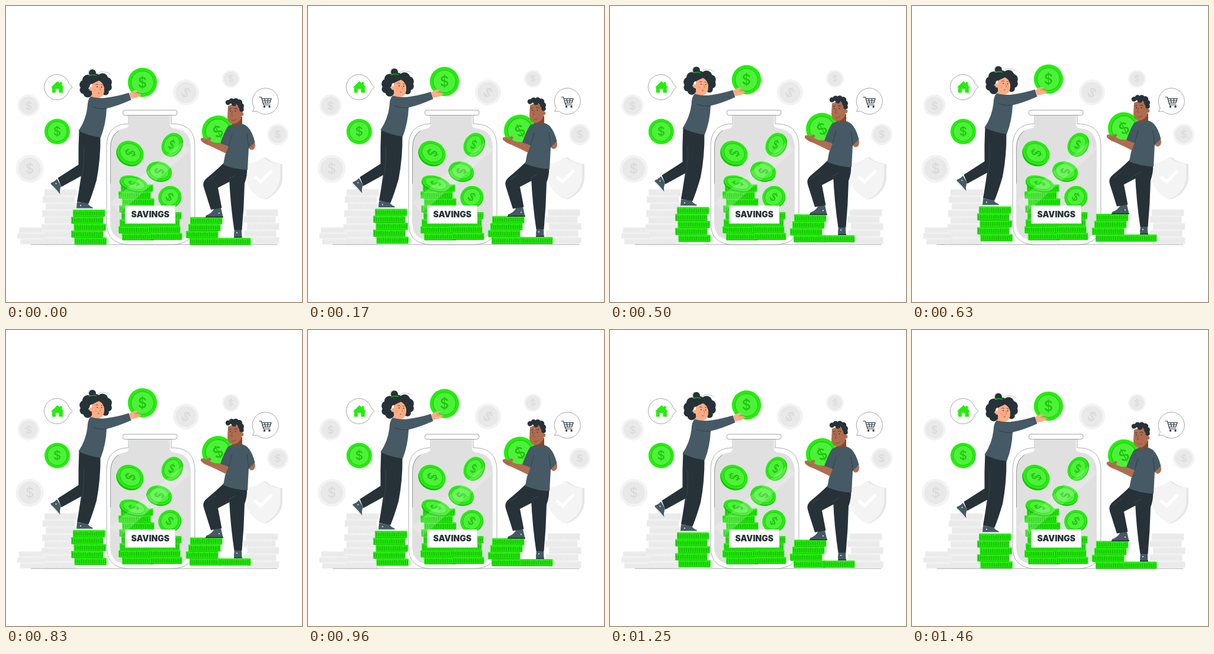
Recreate the animation shown at these times as an HTML page with a canvas. Size 500 by 500 pixels, loop 1.5 s.

```html
<!DOCTYPE html>
<html lang="en">
<head>
<meta charset="utf-8">
<title>Savings</title>
<style>
  html, body { margin: 0; width: 100%; height: 100%; overflow: hidden; background: #fff; }
  canvas { display: block; width: 100vw; height: 100vh; }
</style>
</head>
<body>
<canvas id="stage" width="500" height="500"></canvas>
<script>
const ctx = document.getElementById('stage').getContext('2d');
const LOOP = 1500, LIFT = 20 / 3;
const INK = '#263238', SHIRT = '#455a64', LINE = '#6d7377';
const GREEN = { rim: '#24ee0c', face: '#4df139', mark: '#1cc40b', edge: '#17bd08', ridge: '#0b8500', seam: '#0f9d03' };
const GREY = { rim: '#f3f3f3', face: '#e9e9e9', mark: '#dadada', edge: '#e3e3e3' };
const PALE = { rim: '#ededed', ridge: '#e2e2e2', seam: '#f9f9f9' };

function shape(d, fill, stroke, width = 0.7) {
  const p = new Path2D(d);
  if (fill) { ctx.fillStyle = fill; ctx.fill(p); }
  if (stroke) { ctx.strokeStyle = stroke; ctx.lineWidth = width; ctx.stroke(p); }
}

function disc(x, y, r, fill, stroke, width = 0.7, ry = r) {
  ctx.beginPath();
  ctx.ellipse(x, y, r, ry, 0, 0, 7);
  if (fill) { ctx.fillStyle = fill; ctx.fill(); }
  if (stroke) { ctx.strokeStyle = stroke; ctx.lineWidth = width; ctx.stroke(); }
}

// A coin seen at an angle; depth is the visible thickness, turn rotates the mark.
function coin(x, y, rx, ry, tilt, tone, turn = 0, depth = 0) {
  ctx.save();
  ctx.translate(x, y);
  ctx.rotate(tilt);
  ctx.scale(rx / 25, ry / 25);
  if (depth) disc(0, depth, 25, tone.edge);
  disc(0, 0, 25, tone.rim);
  disc(0, 0, 19.3, tone.face, tone.edge, 0.9);
  ctx.rotate(turn);
  ctx.fillStyle = tone.mark;
  ctx.font = '500 24px Inter, sans-serif';
  ctx.textAlign = 'center';
  ctx.textBaseline = 'alphabetic';
  ctx.fillText('$', 0, 8.7);
  ctx.restore();
}

// One coin per left edge, stacked downwards from the top.
function stack(top, lefts, tone, h = 11.75, w = 54.5) {
  lefts.forEach((x, i) => {
    const y = top + i * h;
    ctx.fillStyle = tone.rim;
    ctx.beginPath();
    ctx.roundRect(x, y, w, h, 1.2);
    ctx.fill();
    ctx.strokeStyle = tone.ridge;
    ctx.lineWidth = 0.75;
    ctx.beginPath();
    for (let k = 0; k < 17; k++) {
      const lx = x + 2.6 + k * (w - 5) / 16;
      ctx.moveTo(lx, y + 2.4 + k % 3 * 0.5);
      ctx.lineTo(lx, y + h - 2);
    }
    ctx.stroke();
    ctx.strokeStyle = tone.seam;
    ctx.beginPath();
    ctx.moveTo(x + 1, y + h - 0.3);
    ctx.lineTo(x + w - 1, y + h - 0.3);
    ctx.stroke();
  });
}

function background() {
  coin(38, 168, 18.7, 18.7, 0, GREY);
  coin(40, 275, 23.6, 23.6, 0, GREY);
  coin(304, 146, 22, 22, 0, GREY, 0.6);
  coin(380, 123, 15, 15, 0, GREY);
  coin(459, 217, 18, 18, 0, GREY);

  shape('M438 255Q449 265 467 267V292Q464 316 438 327Q409 313 405 288V267Q426 265 438 255Z', '#e6e6e6');
  shape('M434 255Q445 265 463 267V292Q460 316 434 327Q407 313 404 288V267Q423 265 434 255Z', '#f4f4f4');
  shape('M420 288L430 297L449 278', null, '#fff', 5.5);

  stack(374, [22, 19, 24], PALE, 9.7);
  stack(309.5, [65, 62, 67, 61, 65, 60, 66, 64], PALE);
  stack(343.5, [405, 401, 407, 402, 407], PALE);
  shape('M42 403H458', null, LINE, 0.6);
}

function bubbles() {
  shape('M106.3 130.5L112 137.2L106.5 143A21.4 21.4 0 1 1 106.3 130.5Z', '#fff', LINE, 0.65);
  shape('M76 137.5L87 127L91 130.8V128.5H94.5V134L98 137.5H96V146.5H89.5V140H84V146.5H78V137.5Z', GREEN.rim);

  shape('M419.4 172.2L416.5 178.2L424 177.6A22 22 0 1 0 419.4 172.2Z', '#fff', LINE, 0.65);
  shape('M427.5 154H431.5L435 167H446.5M432 156.5H448L445.5 164H434.3M433 160H446.5M437 156.5L438.3 164M442.5 156.5L442 164', null, INK, 1.2);
  disc(436.5, 170, 1.7, INK);
  disc(445, 170, 1.7, INK);
}

function jar() {
  const body = 'M207 184V201Q207 206 200 207Q176 211 176 239V366Q176 395 207 395.5H282Q312 395 312 366V239Q312 211 286 207Q277 206 277 201V184Z';
  shape('M207 184V199H204Q170 201 170 237V366Q170 402 207 403H281Q319 402 319 366V237Q319 201 284 199H279V184Z', '#fff', LINE, 0.6);
  shape(body, '#e0e0e0');
  shape('M176.5 300V239Q177 219 190 211', null, '#666', 0.6);
  shape('M200.5 176H286Q289 176 289 179V181Q289 184.5 285.5 184.5H200Q197.5 184 197.5 181.5V179Q197.5 176 200.5 176Z', '#fff', LINE, 0.65);

  stack(301.5, [194, 190, 196, 191, 195, 192, 190, 196], GREEN);
  stack(348, [242, 239, 240, 243], GREEN);

  coin(210, 248, 23.4, 19.5, 0.5, GREEN, 1.4, 3.5);
  coin(280, 234, 20.8, 16.2, -1.05, GREEN, 1.35, 3);
  coin(259, 279, 21.6, 16, 0.25, GREEN, 1.5, 3);
  coin(216, 299.5, 24.4, 12, 0.28, GREEN, 1.4, 5);
  coin(276.5, 322.5, 19.6, 18.3, -0.5, GREEN, 1.1, 1.5);

  ctx.save();
  ctx.clip(new Path2D(body));
  shape('M298 230L312 243L192 350L176 332Z', 'rgba(255,255,255,.2)');
  ctx.restore();

  ctx.fillStyle = '#fff';
  ctx.fillRect(201, 337, 85, 30.5);
  shape('M201 367.5H286V337', null, '#c8c8c8', 0.6);
  ctx.fillStyle = INK;
  ctx.font = '900 14px Inter, sans-serif';
  ctx.textAlign = 'center';
  ctx.textBaseline = 'alphabetic';
  ctx.fillText('SAVINGS', 243.8, 357.2);
}

function woman() {
  const skin = '#ffad86', lips = '#c9603f';
  stack(344, [113, 110, 114.5, 110, 115.5], GREEN);
  coin(230.5, 129, 24.7, 24.7, 0, GREEN);

  // Shoes, then the legs over them
  shape('M86 292L93 304Q90 311 91.5 318Q84 309 76 302L75.5 299Q82 297 86 292Z', SHIRT);
  shape('M76 301Q84 308 91.5 318.5L90 319Q81 310 74.5 301Z', '#e3e6e8');
  disc(84.5, 300, 1, '#fff');
  shape('M120 331L138 333Q140 338 146.5 340V342.5H119Z', SHIRT);
  shape('M119 341.5H147V343.5H119Z', '#dfe3e5');
  disc(126, 337, 1, '#fff');
  shape('M123.5 210Q122 239 122.5 268L87.5 290.5L93.5 305.5L129 286L151 256L158 220Z', INK);
  shape('M124 212L159.5 219Q160 258 153 294Q146 318 139.5 334L120 330.5Q126 296 129 270Q128 242 124 212Z', INK);
  shape('M131 240Q133 269 127 296', null, SHIRT, 0.5);

  shape('M142 147H157V160L145 159Z', skin);
  shape('M143 153Q138 157 137.5 171Q135 192 122.5 211Q139 219 160 222Q169 199 170 173Q188 169 211.5 158.5L207.5 146.5Q187 153 165 155.5Q154 156 143 153Z', SHIRT);
  shape('M170 173Q158 175 146 170', null, INK, 0.6);
  shape('M208 148Q214 143 219 142L223 144L217 147.5Q223 146 228.5 149.5L226 153Q219 155.5 211.5 156.5Z', skin);
  shape('M217 148L227 150', null, '#d87f58', 0.6);

  const curls = [[146, 113, 6], [138, 125, 9], [151, 124, 10], [163, 123, 9.5], [170, 129, 8.8],
    [133, 133, 8.8], [131, 142, 6.5], [138, 147, 7.5], [172, 137, 6.8], [168, 145, 5.8]];
  curls.forEach(([x, y, r]) => disc(x, y, r, INK));
  shape('M140.5 118Q146 115 153 117.5', null, GREEN.edge, 1.3);
  shape('M154 116Q159 109 167 112Q174 112 176 116M140 117Q136 108 145 107', null, '#7d858a', 0.5);
  shape('M145 132Q150 129 157 126Q163 129 165 135Q167 142 165 148Q162 155 156 155Q149 154 145 147Z', skin);
  disc(143.8, 140, 3.3, skin);
  disc(154, 136.5, 0.9, INK);
  disc(161.6, 137, 0.9, INK);
  shape('M151 133Q153 131 156 133M160 133L163.5 133.5', null, INK, 0.7);
  shape('M158.3 137L160 142L157.8 142.3', null, lips, 0.7);
  disc(156.5, 147, 1.4, lips, null, 0, 1);
  disc(151, 142, 2, 'rgba(255,110,80,.22)');
}

function man() {
  const skin = '#af6d50', shade = '#814930';
  stack(356.5, [311, 308, 304, 310], GREEN);
  stack(391.7, [359], GREEN);

  shape('M352 342L363 341L366.5 356H338V353.5Q347 351 352 342Z', SHIRT);
  shape('M337 355.5H367V357.3H337Z', INK);
  disc(360, 350, 1, '#fff');
  shape('M386 377H398L398.5 391H385.5L385 386Z', SHIRT);
  shape('M385 389.7H399V391.5H385Z', INK);
  disc(390, 383, 1, '#fff');
  shape('M371 264L407 274Q408 286 403 300Q402 340 398.5 378.5H385.5Q379 335 377 291Z', INK);
  shape('M369 264Q357 276 340 290Q331 297 334 306L346 344L364.5 341L358 307L383 294L391 270Z', INK);
  shape('M376 292L387 286M341 296Q347 290 355 286', null, SHIRT, 0.6);

  coin(358, 212, 27, 27, -0.12, GREEN, -0.35);
  disc(415, 235, 6, skin, null, 0, 8);
  shape('M329 224Q333 221 338 225Q346 229 353 231L375 232L378 239L371 249Q357 242 344 236Q334 233 329 227Z', skin);
  shape('M338 225L344 221L347 224L343 229Z', skin);
  shape('M333 228L341 231', null, shade, 0.6);
  shape('M382 187H399V203Q390 207 382 201Z', shade);
  shape('M382 200L375 203Q369 212 362 232L376 237L370 252L367 268Q386 276 408 277L410 240L420.5 230Q416 212 408 204Q402 199 397 199Q389 203 382 200Z', SHIRT);
  shape('M376 237L382 216M410 240L407 216', null, INK, 0.6);

  shape('M375 169Q385 164 395 167L399 179L397 190Q392 199 383 199Q374 197 374 187Z', skin);
  disc(398, 182.5, 3.3, skin);
  [[375, 163, 4.2], [381, 160.5, 4.6], [388, 160.8, 5], [394, 163, 5.2], [397, 169, 5], [398, 175, 3.8], [385, 165, 4]]
    .forEach(([x, y, r]) => disc(x, y, r, INK));
  disc(379, 177.5, 0.9, INK);
  disc(387.5, 177.5, 0.9, INK);
  shape('M376.5 174L380.5 173.5M385 173.5Q388 172 390.5 174', null, INK, 0.8);
  shape('M382.5 178L380.5 185L383.5 185.3', null, shade, 0.8);
  shape('M381 193Q386 194.5 389 191', null, shade, 0.9);
}

function draw(time) {
  const phase = time % LOOP / LOOP;
  const lift = LIFT * (1 - Math.abs(1 - 2 * phase));
  ctx.clearRect(0, 0, 500, 500);
  background();
  bubbles();
  coin(86.5, 212, 21.5, 21.5, 0, GREEN);
  jar();
  ctx.save();
  ctx.translate(0, -lift);
  woman();
  man();
  ctx.restore();
}

const start = performance.now();
function tick() {
  draw(performance.now() - start);
  requestAnimationFrame(tick);
}
tick();
</script>
</body>
</html>
```
